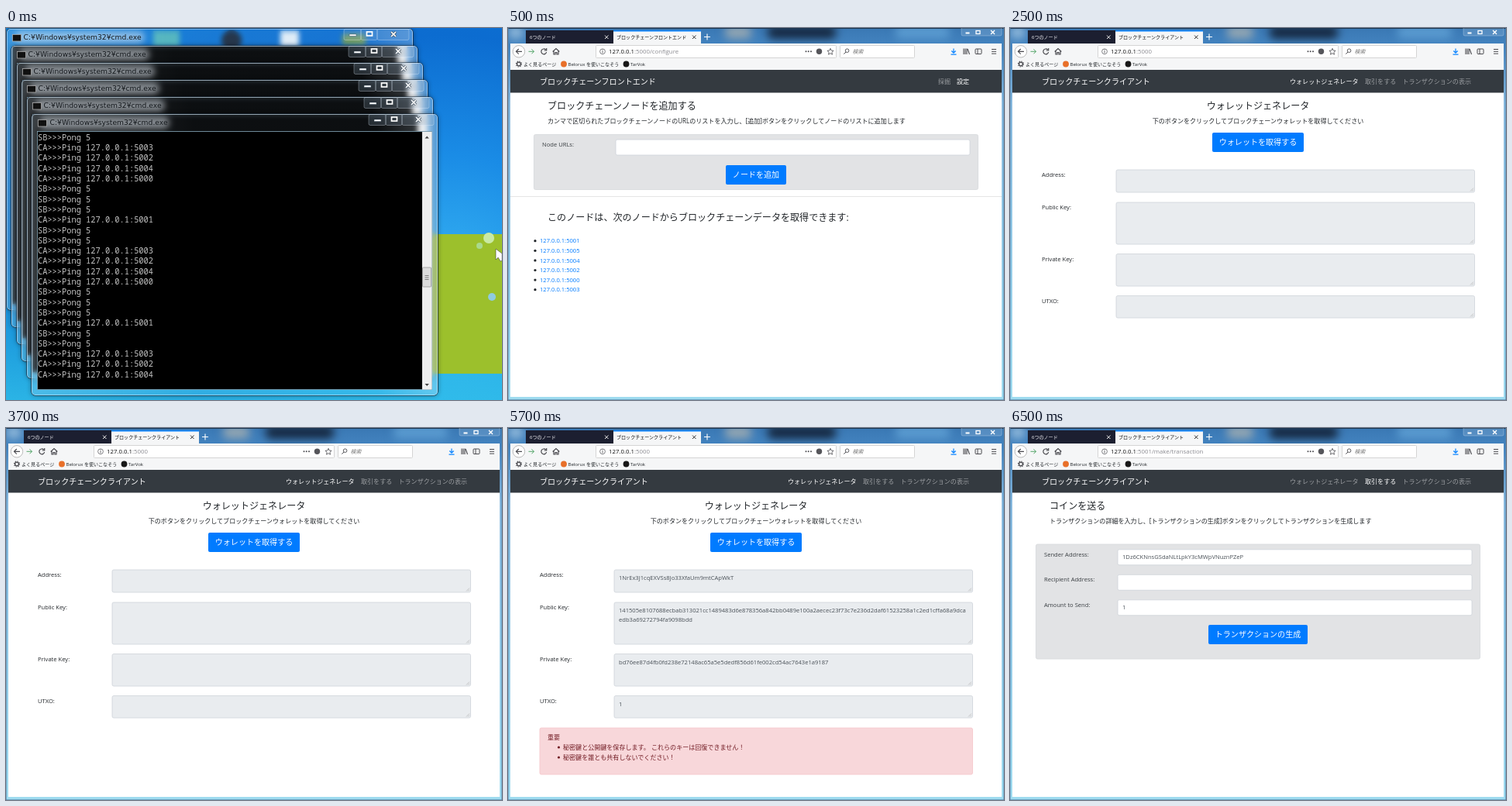
An HTML page for the animation above (8000 ms loop, 640 by 480 pixels).

```html
<!DOCTYPE html>
<html lang="ja">
<head>
<meta charset="utf-8">
<title>Blockchain demo</title>
<style>
html, body { margin: 0; width: 100%; height: 100%; overflow: hidden; }
.scene { position: absolute; left: 0; top: 0; width: 640px; height: 480px; overflow: hidden; background: #fff; }
svg { position: absolute; left: 0; top: 0; display: block; }
text { font-family: "Open Sans", "Noto Sans CJK JP", "Noto Sans CJK", sans-serif; white-space: pre; }
.mono { font-family: "Noto Sans Mono", monospace; font-weight: 300; }
.caption { font-family: "DejaVu Sans", sans-serif; }
.win { position: absolute; box-sizing: border-box; width: 524px; height: 363px; border-radius: 5px;
  background: linear-gradient(to right, rgba(220, 235, 250, .2), rgba(175, 210, 240, .07) 40% 85%, rgba(220, 235, 250, .3));
  backdrop-filter: blur(3px);
  box-shadow: inset 0 0 0 1px rgba(225, 242, 255, .5), 0 0 0 .6px #123, 0 0 6px rgba(0, 0, 0, .45); }
</style>
</head>
<body>
<script>
const INK = '#212529', BLUE = '#007bff', FIELD = '#495057';

// y is the visual middle of the line
const text = (x, y, s, size = 8.05, fill = INK, attr = '') =>
  `<text x="${x}" y="${y + size * .37}" font-size="${size}" fill="${fill}" ${attr}>${s}</text>`;
const latin = (x, y, s, fill = INK) => text(x, y - .4, s, 7.6, fill);
const rect = (x, y, w, h, fill, stroke = 'none', r = 0, attr = '') =>
  `<rect x="${x}" y="${y}" width="${w}" height="${h}" fill="${fill}" stroke="${stroke}" rx="${r}" ${attr}/>`;
const dot = (x, y, r, fill, attr = '') => `<circle cx="${x}" cy="${y}" r="${r}" fill="${fill}" ${attr}/>`;
const line = (d, stroke, w = 1) => `<path d="${d}" fill="none" stroke="${stroke}" stroke-width="${w}"/>`;
const svg = (body, w = 640, h = 480) => `<svg width="${w}" height="${h}">${body}</svg>`;

// ---- desktop with terminal windows ----

const wallpaper = svg(`<defs>
  <radialGradient id="sky" gradientUnits="userSpaceOnUse" cx="570" cy="350" r="620">
    <stop offset="0" stop-color="#3ab8f4"/><stop offset=".3" stop-color="#1a8ce6"/>
    <stop offset=".55" stop-color="#0c6cd0"/><stop offset="1" stop-color="#1080d8"/>
  </radialGradient>
  <linearGradient id="floor" x2="0" y2="1">
    <stop offset=".6" stop-color="#2cc4e4" stop-opacity="0"/><stop offset="1" stop-color="#34c6ea" stop-opacity=".75"/>
  </linearGradient></defs>`
  + rect(0, 0, 640, 480, 'url(#sky)') + rect(0, 0, 640, 480, 'url(#floor)')
  + rect(190, 4, 34, 20, '#4fb4bd') + dot(291, 16, 13, '#1c2c40')
  + rect(354, 4, 24, 20, '#e2eef8') + rect(434, 8, 30, 14, '#6f9a58')
  + rect(490, 266, 180, 180, '#9cc02c')
  + dot(623, 271, 7, '#c9e9a4') + dot(611, 281, 4, '#a9d98c') + dot(627, 347, 5, '#8fcbe0')
  + '<path d="M632 285v14l3-3 3 5 2-1v-9z" fill="#fff" stroke="#333" stroke-width=".5"/>');

function controls(right, top) {
  const box = (x, w) => rect(x, top, w, 14, 'rgba(150,175,200,.2)', 'rgba(230,240,250,.4)', 2, 'stroke-width=".8"');
  return box(right - 87, 22) + box(right - 65, 21) + box(right - 44, 41)
    + rect(right - 80, top + 6.5, 9, 2.6, '#fff', '#345', .5, 'stroke-width=".5"')
    + rect(right - 57.5, top + 3.5, 7, 5, 'none', '#fff', 0, 'stroke-width="1.7"')
    + line(`M${right - 26} ${top + 3.5}l6 6m0-6l-6 6`, '#345', 3) + line(`M${right - 26} ${top + 3.5}l6 6m0-6l-6 6`, '#fff', 1.7);
}

const log = [...Array(24).keys()].map(i => {
  const port = '-3240---1-'[i % 10];
  const s = port === '-' ? 'SB&gt;&gt;&gt;Pong 5' : 'CA&gt;&gt;&gt;Ping 127.0.0.1:500' + port;
  return text(8, 30 + i * 13.3, s, 10.35, '#c4c4c4', 'class="mono"');
}).join('');

function terminal(i) {
  const front = i === 5, shift = front ? 2 : 0;
  const body = rect(10, 3, 168, 16, '#dfe7ef', 'none', 8, 'opacity=".55" style="filter:blur(4px)"')
    + rect(7.5 + shift / 2, 7.5, 11, 8.5, '#111', '#aaa', 0, 'stroke-width=".8"')
    + text(21.6 + shift, 10.6, 'C:¥Windows¥system32¥cmd.exe', 9.2, '#14181c', 'class="caption"')
    + controls(522, .5)
    + rect(7.5, 22.5, 509, 333, '#000', '#8ab', 0, 'stroke-width=".8"')
    + rect(504, 23, 12.5, 332.5, '#efefef')
    + rect(504.5, 198, 11, 25, '#dcdcdc', '#999', 1, 'stroke-width=".8"')
    + line('M507.5 208.500h5m-5 2.500h5m-5 2.500h5', '#666', .8)
    + '<path d="M507.500 31.500l2.700-3 2.700 3zM507.500 348l2.700 3 2.700-3z" fill="#444"/>'
    + (front ? log : '');
  return `<div class="win" style="left:${1 + i * 6.4}px;top:${1 + i * 22}px">${svg(body, 524, 363)}</div>`;
}

const desktop = wallpaper + [0, 1, 2, 3, 4, 5].map(terminal).join('');

// ---- browser ----

function chrome(title, port, path) {
  const grey = '#4a4a4f', soft = '#8a8a90';
  const blob = (x, w, c) => rect(x, -3, w, 17, c, 'none', 6, 'style="filter:blur(6px)"');
  const frame = `<defs><linearGradient id="glass" x2="0" y2="1">
      <stop offset="0" stop-color="#3a78b4"/><stop offset=".05" stop-color="#4484c0"/>
      <stop offset=".2" stop-color="#86b8de"/><stop offset="1" stop-color="#9fdcf0"/>
    </linearGradient></defs>` + rect(0, 0, 640, 480, 'url(#glass)')
    + blob(0, 20, '#8fb8da') + blob(280, 34, '#93a6b2') + blob(335, 88, '#15273f') + blob(500, 70, '#5a9bd0')
    + line('M0 .5H640', '#1b344e') + line('M.5 0V480M639.500 0V480M0 479.500H640', '#4f7fa4', .6);
  const caption = rect(585, -3, 52, 13, 'rgba(190,215,235,.2)', 'rgba(235,245,255,.4)', 2, 'stroke-width=".7"')
    + line('M590.500 6.500h5', '#fff', 2) + rect(604, 3.5, 5, 4, 'none', '#fff', 0, 'stroke-width="1.300"')
    + line('M623 3l5 5m0-5l-5 5', '#fff', 1.4);
  const tabs = rect(23, 3, 113, 17, '#1c1f30') + rect(136, 3, 113, 17, '#f5f6f7') + rect(136, 3, 113, 1.5, '#0a84ff')
    + text(28, 11.5, '6つのノード', 6.05, '#f4f4f8') + text(140, 11.5, title, 6.05, '#0c0c0d')
    + line('M125 9.500l4.500 4.500m0-4.500l-4.500 4.500', '#eee') + line('M238 9.500l4.500 4.500m0-4.500l-4.500 4.500', '#333')
    + line('M257 7.500v8m-4-4h8', '#fff', 1.1);
  const bar = rect(3, 20, 634, 35, '#f5f6f7')
    + dot(14, 30.3, 7.7, '#fff', 'stroke="#aaa" stroke-width=".8"')
    + line('M18 30.300h-7.500m3.300-3.300l-3.300 3.300 3.300 3.300', grey, 1.2)
    + line('M26.500 30.300h7m-3-3l3 3-3 3', '#55a66a', 1)
    + line('M48.700 28a3.400 3.400 0 1 0 .9 3M49.700 26v3h-3', grey, 1.2)
    + line('M57.700 30.500l4.300-4 4.300 4M59 30v4h2v-2.500h2v2.500h2v-4', grey, 1.2)
    + rect(113.5, 22.5, 310, 16, '#fff', '#ccc', 1, 'stroke-width=".8"')
    + dot(122, 30.3, 3.4, 'none', `stroke="${grey}" stroke-width=".7"`) + line('M122 29.500v2.700m0-4.500v.9', grey, .9)
    + text(130, 30.3, `127.0.0.1<tspan fill="${soft}">:${port}${path}</tspan>`, 7.8, '#0c0c0d')
    + dot(384.5, 30.3, 1, grey) + dot(387.7, 30.3, 1, grey) + dot(391, 30.3, 1, grey)
    + dot(401.5, 30.3, 3.7, '#55555a')
    + '<path d="M416 26.300l1.200 2.700 2.900.3-2.200 2 .6 2.900-2.500-1.500-2.500 1.500.6-2.900-2.200-2 2.900-.3z" fill="none" stroke="#4a4a4f" stroke-width=".8"/>'
    + rect(428.5, 22.5, 96, 16, '#fff', '#ccc', 1, 'stroke-width=".8"')
    + dot(437.6, 29.2, 2.3, 'none', `stroke="${grey}" stroke-width=".9"`) + line('M436 31l-2.600 2.600', grey, 1)
    + text(444.5, 30.3, '検索', 7, '#777', 'font-style="italic"')
    + line('M575 26.500v5.500m-2.700-2.500l2.700 2.700 2.700-2.700M571.500 34.200h7', '#0a84ff', 1.2)
    + line('M588 26.500v7.500m2-7.500v7.500m2-7.500v7.500m1-7l2.500 7', grey, 1.1)
    + rect(603, 27, 8, 6.5, 'none', grey, 1) + line('M606 27v6.500', grey)
    + line('M624 27.500h6m-6 2.800h6m-6 2.800h6', grey, 1);
  const bookmarks = dot(14, 46.5, 2.4, 'none', `stroke="${grey}" stroke-width="1.300"`)
    + dot(14, 46.5, 3.5, 'none', `stroke="${grey}" stroke-width="1.200" stroke-dasharray="1.200 1.550"`)
    + text(20, 46.5, 'よく見るページ', 6.05)
    + dot(72, 46.5, 3.9, '#e8702a') + text(77.5, 46.5, 'Belorux を使いこなそう', 6.05)
    + dot(152.5, 46.5, 3.9, '#181818') + text(158, 46.5, 'TarVok', 6.05);
  return frame + caption + tabs + bar + bookmarks + rect(3, 83, 634, 393, '#fff');
}

// links: [x, label]; the one at index "active" is bright
function page(brand, links, active, port, path, body) {
  const nav = rect(3, 54, 634, 29.5, '#343a40') + text(41, 69.3, brand, 10.06, '#fff')
    + links.map(([x, s], i) => text(x, 69.3, s, 8.05, i === active ? '#fff' : '#9a9da0')).join('');
  return svg(chrome(brand, port, path) + nav + body);
}

const input = (y, s = '') => rect(139, y, 457, 20, '#fff', '#ced4da', 2, 'stroke-width=".8"') + latin(145, y + 10, s, FIELD);
const panel = (y, h) => rect(33.5, y, 573, h, '#e2e3e5', '#d6d8db', 2, 'stroke-width=".8"');
const button = (x, y, w, s) => rect(x, y, w, 25, BLUE, 'none', 2)
  + text(x + w / 2, y + 12.5, s, 10.06, '#fff', 'text-anchor="middle"');

const peers = [1, 5, 4, 2, 0, 3].map((n, i) =>
  dot(35, 274.7 + i * 12.6, 1.6, INK) + latin(41, 275 + i * 12.6, '127.0.0.1:500' + n, BLUE)).join('');

const configure = page('ブロックチェーンフロントエンド', [[555, '採掘'], [579, '設定']], 1, 5000, '/configure',
  text(51, 101, 'ブロックチェーンノードを追加する', 12.07)
  + text(51, 120.5, 'カンマで区切られたブロックチェーンノードのURLのリストを入力し、[追加]ボタンをクリックしてノードのリストに追加します')
  + panel(137.5, 71) + latin(44, 150.5, 'Node URLs:', '#383d41') + input(144)
  + button(281, 177, 78, 'ノードを追加')
  + line('M3 217.500H637', '#e5e5e5')
  + text(51, 244.5, 'このノードは、次のノードからブロックチェーンデータを取得できます:', 12.07) + peers);

const client = (active, port, path, body) => page('ブロックチェーンクライアント',
  [[361, 'ウォレットジェネレータ'], [458, '取引をする'], [506.5, 'トランザクションの表示']], active, port, path, body);

const fields = [['Address:', 183, 29], ['Public Key:', 225, 54], ['Private Key:', 291.5, 41.5], ['UTXO:', 345.5, 28.5]];

function wallet(values) {
  const rows = fields.map(([label, y, h], i) => latin(41, y + 6.7, label)
    + rect(137, y, 462.5, h, '#e9ecef', '#ced4da', 2, 'stroke-width=".8"')
    + line(`M594 ${y + h - 1.5}l4-4m-1.800 4l1.800-1.800`, '#aaa', .6)
    + (values[i] || []).map((s, n) => latin(143, y + 10.7 + n * 12.3, s, FIELD)).join('')).join('');
  return text(320, 101, 'ウォレットジェネレータ', 12.07, INK, 'text-anchor="middle"')
    + text(320, 120.5, '下のボタンをクリックしてブロックチェーンウォレットを取得してください', 8.05, INK, 'text-anchor="middle"')
    + button(261, 135, 118, 'ウォレットを取得する') + rows;
}

const keys = [
  ['1NrEx3J1cqEXVSs8Jo33XfaUm9mtCApWkT'],
  ['141505e8107688ecbab313021cc1489483d6e878356a842bb0489e100a2aecec23f73c7e236d2daf61523258a1c2ed1cffa68a9dca',
    'edb3a69272794fa9098bdd'],
  ['bd76ee87d4fb0fd238e72148ac65a5e5dedf856d61fe002cd54ac7643e1a9187'],
  ['1']
];

const RED = '#721c24';
const notice = rect(41, 387, 558.5, 60, '#f8d7da', '#f5c6cb', 2, 'stroke-width=".8"')
  + text(51, 399.5, '重要', 8.05, RED)
  + dot(65.5, 412, 1.6, RED) + text(71, 412, '秘密鍵と公開鍵を保存します。 これらのキーは回復できません！', 8.05, RED)
  + dot(65.5, 425, 1.6, RED) + text(71, 425, '秘密鍵を誰とも共有しないでください！', 8.05, RED);

const send = client(1, 5001, '/make/transaction',
  text(51, 101, 'コインを送る', 12.07)
  + text(51, 120.5, 'トランザクションの詳細を入力し、[トランザクションの生成]ボタンをクリックしてトランザクションを生成します')
  + panel(150, 148)
  + [['Sender Address:', '1Dz6CKNnsGSdaNLtLpkY3cMWpVNuznPZeP'], ['Recipient Address:', ''], ['Amount to Send:', '1']]
    .map(([label, s], i) => latin(44, 163.3 + i * 32.5, label, '#383d41') + input(156.8 + i * 32.5, s)).join('')
  + button(256, 254, 128, 'トランザクションの生成'));

// ---- playback ----

const scenes = [[0, desktop], [500, configure], [2500, client(0, 5000, '', wallet([]))],
  [4500, client(0, 5000, '', wallet(keys) + notice)], [6500, send]];

const nodes = scenes.map(([, html]) => {
  const node = document.createElement('div');
  node.className = 'scene';
  node.innerHTML = html;
  document.body.append(node);
  return node;
});

const start = performance.now();
function draw(now) {
  const t = Math.max(0, now - start) % 8000;
  const current = scenes.filter(([from]) => from <= t).length - 1;
  nodes.forEach((node, i) => node.style.visibility = i === current ? 'visible' : 'hidden');
  requestAnimationFrame(draw);
}
draw(start);
</script>
</body>
</html>
```
